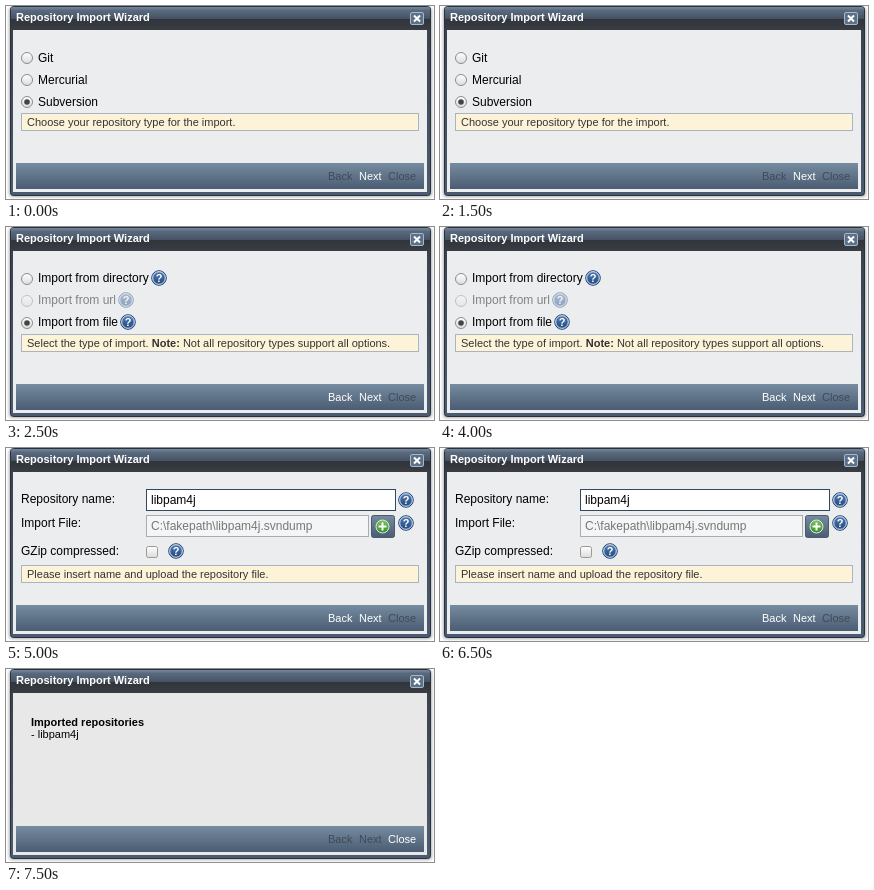
An HTML page for the animation above (10 s loop, 428x193 px).

```html
<!DOCTYPE html>
<html lang="en">
<head>
<meta charset="utf-8">
<title>Import wizard</title>
<style>
html, body { margin: 0; width: 100%; height: 100%; overflow: hidden; background: #fff; }
svg { display: block; width: 428px; height: 193px; }
text { font-family: "Liberation Sans", Arial, sans-serif; font-size: 12px; fill: #000; white-space: pre; }
.s { font-size: 11px; }
.b { font-weight: bold; }
.scene { opacity: 0; }
</style>
</head>
<body>
<svg id="stage" viewBox="0 0 428 193" xmlns="http://www.w3.org/2000/svg">
  <defs>
    <linearGradient id="frame" x2="0" y2="1">
      <stop stop-color="#53606f"/><stop offset=".12" stop-color="#3b424c"/><stop offset="1" stop-color="#4b5c72"/>
    </linearGradient>
    <linearGradient id="title" x2="0" y2="1">
      <stop stop-color="#77889c"/><stop offset=".15" stop-color="#5a6a7e"/><stop offset=".5" stop-color="#465364"/>
      <stop offset=".52" stop-color="#30353c"/><stop offset="1" stop-color="#3a3d42"/>
    </linearGradient>
    <linearGradient id="bar" x2="0" y2="1">
      <stop stop-color="#768ca0"/><stop offset="1" stop-color="#4b5c73"/>
    </linearGradient>
    <linearGradient id="knob" x2="0" y2="1">
      <stop stop-color="#fff"/><stop offset="1" stop-color="#dcdcdc"/>
    </linearGradient>
    <linearGradient id="blue" x2="0" y2="1">
      <stop stop-color="#5680b4"/><stop offset="1" stop-color="#1d4580"/>
    </linearGradient>
    <linearGradient id="green" x2="0" y2="1">
      <stop stop-color="#7cc75c"/><stop offset="1" stop-color="#2f8f2c"/>
    </linearGradient>
    <filter id="soft" x="-5%" y="-5%" width="110%" height="115%"><feGaussianBlur stdDeviation="1.6"/></filter>
  </defs>
  <rect x="3" y="1" width="423" height="190" rx="4" fill="#777" opacity=".6" filter="url(#soft)"/>
  <rect x="4.5" y=".5" width="420" height="189" rx="3" fill="url(#frame)" stroke="#28323f"/>
  <rect x="5" y="1" width="419" height="23" rx="2" fill="url(#title)"/>
  <text class="s b" x="10" y="15" style="fill:#fff">Repository Import Wizard</text>
  <rect x="404.5" y="6.5" width="13" height="12" rx="1.5" fill="#5b7189" stroke="#a9b7c6"/>
  <path d="M408 9.5l6 6m0-6l-6 6" stroke="#fff" stroke-width="2"/>
</svg>
<script>
const stage = document.getElementById("stage");
const LOOP = 10000;

const text = (x, y, s, cls = "", fill = "#000") =>
  `<text x="${x}" y="${y}" class="${cls}" style="fill:${fill}">${s}</text>`;

const box = (x, y, w, h, fill, stroke, rx = 0) =>
  `<rect x="${x + .5}" y="${y + .5}" width="${w - 1}" height="${h - 1}" rx="${rx}" fill="${fill}" stroke="${stroke}"/>`;

const fade = (s, on) => `<g opacity="${on ? 1 : .45}">${s}</g>`;

const radio = (y, on) =>
  `<circle cx="21" cy="${y}" r="5.5" fill="url(#knob)" stroke="#8c8c8c"/>` +
  (on ? `<circle cx="21" cy="${y}" r="2.8" fill="#444"/>` : "");

const help = (x, y) =>
  `<circle cx="${x}" cy="${y}" r="7.3" fill="url(#blue)" stroke="#274a7c"/>
   <circle cx="${x}" cy="${y}" r="6.3" fill="none" stroke="#dce6f2"/>
   <text x="${x}" y="${y + 4}" class="s b" text-anchor="middle" style="fill:#fff">?</text>`;

const hint = (y, s) => box(15, y, 398, 18, "#fdf3d9", "#a9b4c2") + text(21, y + 13, s, "s", "#333");

const footer = active =>
  `<rect x="10" y="157" width="408" height="26" fill="url(#bar)"/>` +
  [["Back", 322], ["Next", 353], ["Close", 382]].map(([s, x]) =>
    text(x, 174, s, "s", active.includes(s) ? "#fff" : "#3f4a58")).join("");

const panel = (fill, body, active) =>
  `<rect x="7" y="24" width="414" height="162" fill="${fill}"/>` + body + footer(active);

const scenes = [
  panel("#ebedef",
    ["Git", "Mercurial", "Subversion"].map((s, i) =>
      radio(52 + 22 * i, i === 2) + text(32, 56 + 22 * i, s)).join("") +
    hint(107, "Choose your repository type for the import."),
    ["Next"]),

  panel("#ebedef",
    [["directory", 153, 51], ["url", 120, 73], ["file", 122, 95]].map(([s, x, y], i) =>
      fade(radio(52 + 22 * i, i === 2) + text(32, 55 + 22 * i, "Import from " + s) + help(x, y), i !== 1)).join("") +
    hint(107, 'Select the type of import. <tspan class="b">Note:</tspan> Not all repository types support all options.'),
    ["Back", "Next"]),

  panel("#ebedef",
    text(15, 55, "Repository name:") + text(15, 79, "Import File:") + text(15, 107, "GZip compressed:") +
    box(140, 41, 250, 22, "#fff", "#33475f") + text(145, 56, "libpam4j") +
    box(140, 67, 223, 22, "#f4f5f6", "#a7adb5") + text(145, 82, "C:\\fakepath\\libpam4j.svndump", "", "#777") +
    box(365, 67, 24, 23, "url(#bar)", "#4b5b6e", 2) +
    `<circle cx="376.5" cy="78.5" r="6.5" fill="url(#green)" stroke="#dcebd6"/>
     <path d="M372.5 78.5h8m-4-4v8" stroke="#fff" stroke-width="2"/>` +
    box(140, 98, 12, 12, "url(#knob)", "#999", 2) +
    help(400, 52) + help(400, 75) + help(170, 103) +
    hint(117, "Please insert name and upload the repository file."),
    ["Back", "Next"]),

  panel("#e8e8e8",
    text(25, 57, "Imported repositories", "s b") + text(25, 69, "- libpam4j", "s"),
    ["Close"])
];

scenes.forEach((body, i) => {
  const g = document.createElementNS("http://www.w3.org/2000/svg", "g");
  g.setAttribute("class", "scene");
  g.innerHTML = body;
  stage.append(g);
  const steps = [[0, 0], [i / 4, 1], [(i + 1) / 4, 0], [1, 0]];
  g.animate(
    steps.map(([offset, opacity]) => ({ offset, opacity, easing: "steps(1, end)" })),
    { duration: LOOP, iterations: Infinity });
});
</script>
</body>
</html>
```
